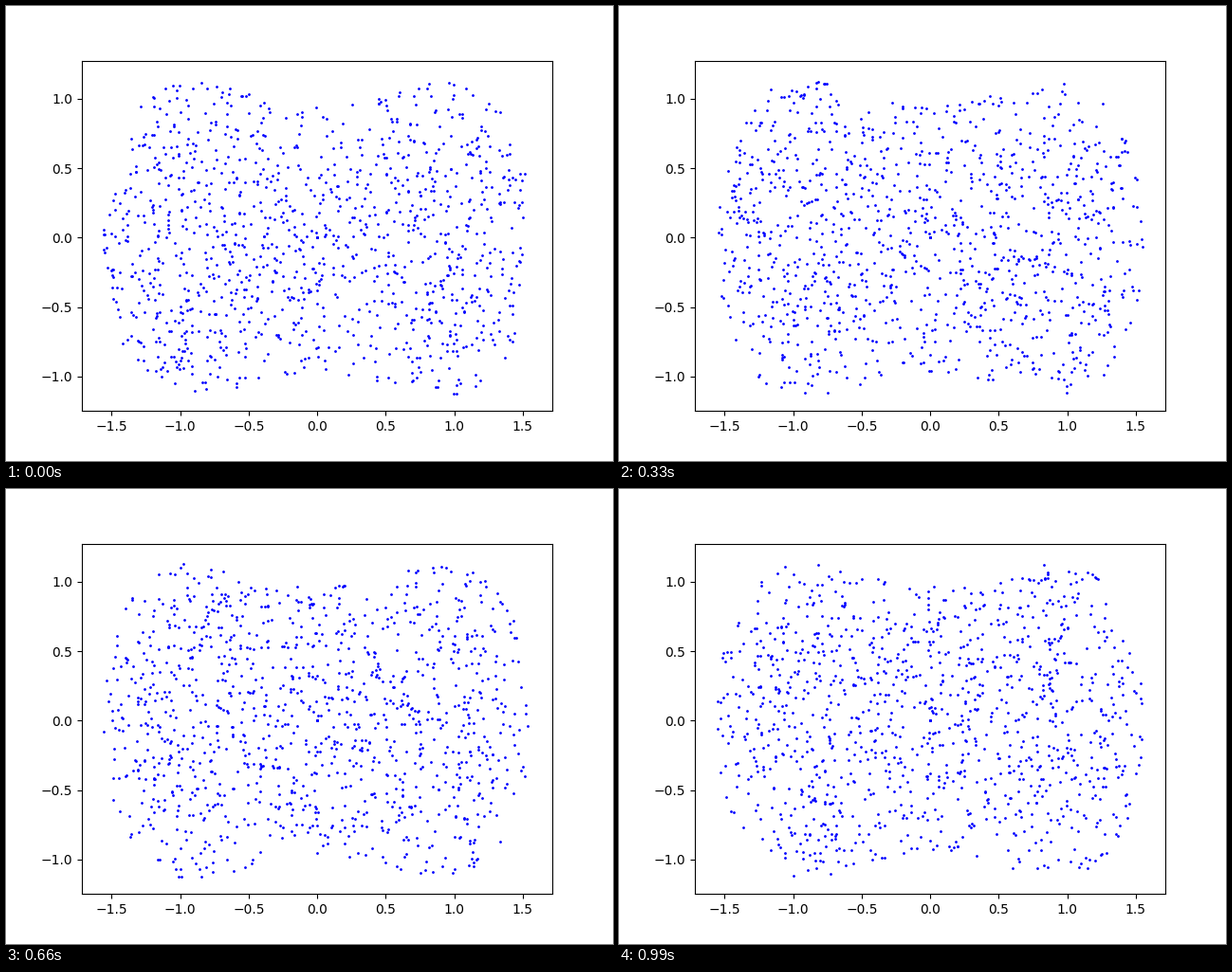
Recreate the animation shown at these times as a matplotlib script. Size 640x480 px, loop 1100 ms.

```python
import matplotlib.pyplot as plt
import numpy as np
from matplotlib.animation import FuncAnimation

FRAMES, INTERVAL = 10, 110
COUNT = 1150
STEP, SUBSTEPS = 0.32, 8
A, B = 0.843, 1.006      # double well: x'' = A x - B x^3
EDGE = 0.93              # highest energy in the cloud
BOTTOM = -A**2 / (2 * B)  # energy at the floor of each well


def force(x):
    return A * x - B * x**3


def energy(x, y):
    return y**2 - A * x**2 + B / 2 * x**4


def initial_cloud():
    """Random points inside the energy contour, a little denser in the wells."""
    rng = np.random.default_rng(7)
    x = rng.uniform(-1.6, 1.6, 6 * COUNT)
    y = rng.uniform(-1.2, 1.2, 6 * COUNT)
    level = (energy(x, y) - BOTTOM) / (EDGE - BOTTOM)
    keep = (level < 1) & (rng.random(x.size) < 1 - 0.4 * level)
    x, y = x[keep][:COUNT], y[keep][:COUNT]
    x[:4] = y[:4] = 0    # resting on the saddle point
    return x, y


def advance(x, y):
    """Leapfrog the cloud through one frame of motion."""
    h = STEP / SUBSTEPS
    for _ in range(SUBSTEPS):
        y = y + force(x) * h / 2
        x = x + y * h
        y = y + force(x) * h / 2
    return x, y


states = [initial_cloud()]
while len(states) < FRAMES:
    states.append(advance(*states[-1]))

fig, ax = plt.subplots(figsize=(6.4, 4.8), dpi=100)
dots, = ax.plot([], [], "b.", markersize=2)
ax.set_xlim(-1.717, 1.7156)
ax.set_ylim(-1.248, 1.275)


def draw(frame):
    dots.set_data(*states[frame])
    return dots,


animation = FuncAnimation(fig, draw, frames=FRAMES, interval=INTERVAL,
                          repeat=True, repeat_delay=0)
plt.show()
```
